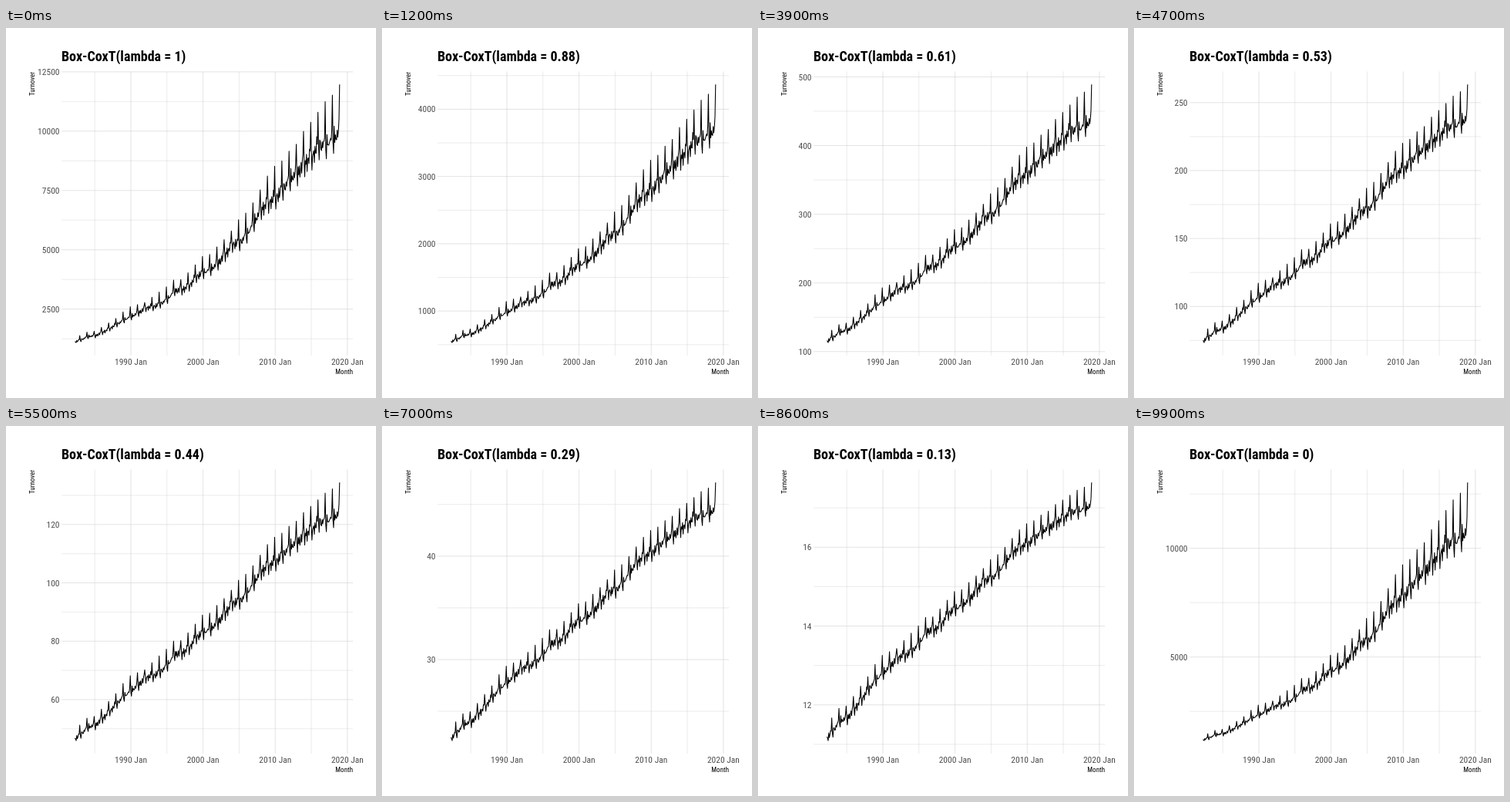
These frames come from a looping animation (480 px wide and 480 px high, 10000 ms). An HTML page with a canvas:

```html
<!DOCTYPE html>
<html lang="en">
<head>
<meta charset="utf-8">
<title>Box-Cox transformation</title>
<style>
html, body { margin: 0; width: 100%; height: 100%; overflow: hidden; background: #fff; }
canvas { display: block; width: 480px; height: 480px; }
</style>
</head>
<body>
<canvas id="stage"></canvas>
<script>
const canvas = document.getElementById('stage');
const ctx = canvas.getContext('2d');
const ratio = window.devicePixelRatio || 1;
canvas.width = canvas.height = 480 * ratio;

const FRAMES = 100, STEP = 100;
const LEFT = 72.2, RIGHT = 450, TOP = 56.4, BOTTOM = 424.9;
const FAMILY = '"Roboto Condensed", Roboto, sans-serif';

// Turnover in December, from 1982
const peaks = [
  1474, 1631, 1671, 1847, 2048, 2255, 2550, 2790, 2890, 2980, 3220, 3455, 3700,
  4010, 4030, 4340, 4700, 5090, 5180, 5530, 5860, 6265, 6780, 7090, 7560, 8156,
  8790, 9245, 9490, 9940, 10266, 10860, 11275, 11740, 12230, 12540, 13032
];
// Turnover in February, from 1982
const lows = [
  1090, 1200, 1340, 1370, 1515, 1680, 1865, 2050, 2190, 2345, 2560, 2600, 2722,
  2935, 3288, 3323, 3499, 3889, 4066, 4207, 4455, 4846, 5272, 5343, 5698, 6232,
  6783, 7068, 7264, 7674, 8103, 8335, 8763, 9070, 9545, 9588, 9840, 10150
];
// Log uplift over the February line, January to November
const season = [0.07, 0, 0.09, 0.065, 0.075, 0.035, 0.075, 0.07, 0.06, 0.095, 0.105];
// Log effect of an extra Sunday to Saturday
const weekday = [-0.012, -0.008, -0.006, -0.002, 0.009, 0.011, 0.008];

function tradingDays(year, month) {
  const days = new Date(Date.UTC(year, month + 1, 0)).getUTCDate();
  const first = new Date(Date.UTC(year, month, 1)).getUTCDay();
  let sum = 0;
  for (let d = 28; d < days; d++) sum += weekday[(first + d) % 7];
  return sum;
}

function turnover(year, month) {
  const y = year - 1982;
  if (month === 11) return peaks[y];
  if (month === 1) return lows[y];
  const a = Math.max(0, month < 1 ? y - 1 : y);
  const part = ((month + 11) % 12) / 12;
  const trend = Math.log(lows[a]) * (1 - part) + Math.log(lows[a + 1]) * part;
  return Math.exp(trend + season[month] + tradingDays(year, month));
}

const xOf = year => 162 + (year - 1990) * 9.364;
const series = [];
for (let n = 3; n < 37 * 12; n++) {
  const year = 1982 + Math.floor(n / 12), month = n % 12;
  series.push({ x: xOf(year + month / 12), value: turnover(year, month) });
}

const boxCox = (x, k) => k === 0 ? Math.log(x) : (Math.pow(x, k) - 1) / k;

// Extended Wilkinson axis breaks
function axisBreaks(lo, hi, m = 5) {
  const Q = [1, 5, 2, 2.5, 4, 3], range = hi - lo, eps = 1e-10;
  let best = -2, found = null;
  const total = (s, c, d) => 0.25 * s + 0.2 * c + 0.5 * d + 0.05;
  const spread = (a, b) => 1 - 0.5 * (a * a + b * b) / (0.01 * range * range);
  for (let j = 1; j < 50; j++) {
    for (let i = 0; i < Q.length; i++) {
      const q = Q[i], plain = 1 - i / (Q.length - 1) - j;
      if (total(plain + 1, 1, 1) < best) return found;
      for (let k = 2; k < 50; k++) {
        const dMax = k >= m ? 2 - (k - 1) / (m - 1) : 1;
        if (total(plain + 1, 1, dMax) < best) break;
        for (let z = Math.ceil(Math.log10(range / (k + 1) / j / q)); z < 12; z++) {
          const step = j * q * Math.pow(10, z), span = step * (k - 1);
          const half = Math.max(0, (span - range) / 2);
          if (total(plain + 1, spread(half, half), dMax) < best) break;
          const end = Math.ceil(lo / step) * j;
          for (let s = Math.floor(hi / step) * j - (k - 1) * j; s <= end; s++) {
            const min = s * step / j, max = min + span;
            const rest = ((min % step) + step) % step;
            const zero = (rest < eps || step - rest < eps) && min <= 0 && max >= 0;
            const r = (k - 1) / span;
            const want = (m - 1) / (Math.max(max, hi) - Math.min(min, lo));
            const score = total(plain + (zero ? 1 : 0), spread(hi - max, lo - min),
              2 - Math.max(r / want, want / r));
            if (score > best) {
              best = score;
              found = { min, step, count: k };
            }
          }
        }
      }
    }
  }
  return found;
}

function text(str, x, y, font, color, align) {
  ctx.font = font + ' ' + FAMILY;
  ctx.fillStyle = color;
  ctx.textAlign = align;
  ctx.fillText(str, x, y);
}

function line(x1, y1, x2, y2, width) {
  ctx.lineWidth = width;
  ctx.beginPath();
  ctx.moveTo(x1, y1);
  ctx.lineTo(x2, y2);
  ctx.stroke();
}

function decimals(values) {
  let n = 0;
  while (n < 4 && values.some(v => Math.abs(v - Number(v.toFixed(n))) > 1e-7)) n++;
  return n;
}

function draw(frame) {
  const shown = Math.round((1 - frame / (FRAMES - 1)) * 100);
  const lambda = shown === 0 ? 1 : (shown - 1) / 100;
  const values = series.map(p => boxCox(p.value, lambda));
  const low = Math.min(...values), high = Math.max(...values);
  const pad = (high - low) * 0.05, lo = low - pad, hi = high + pad;
  const yOf = v => BOTTOM - (v - lo) / (hi - lo) * (BOTTOM - TOP);
  const inside = v => v >= lo && v <= hi;

  ctx.setTransform(ratio, 0, 0, ratio, 0, 0);
  ctx.fillStyle = '#fff';
  ctx.fillRect(0, 0, 480, 480);

  const axis = axisBreaks(lo, hi);
  const major = [], minor = [];
  for (let i = -2; i <= axis.count + 1; i++) {
    const v = axis.min + i * axis.step;
    if (i >= 0 && i < axis.count && inside(v)) major.push(v);
    if (inside(v + axis.step / 2)) minor.push(v + axis.step / 2);
  }

  ctx.strokeStyle = '#ccc';
  minor.forEach(v => line(LEFT, yOf(v), RIGHT, yOf(v), 0.4));
  for (let year = 1985; year <= 2020; year += 5) {
    line(xOf(year), TOP, xOf(year), BOTTOM, year % 10 ? 0.4 : 0.55);
  }
  major.forEach(v => line(LEFT, yOf(v), RIGHT, yOf(v), 0.55));

  ctx.strokeStyle = '#000';
  ctx.lineWidth = 1.07;
  ctx.lineJoin = 'round';
  ctx.beginPath();
  series.forEach((p, i) => ctx.lineTo(p.x, yOf(values[i])));
  ctx.stroke();

  const places = decimals(major);
  const small = 'condensed 11.5px', tiny = 'condensed 9px';
  major.forEach(v => text(v.toFixed(places), 69.5, yOf(v) + 4.1, small, '#4d4d4d', 'right'));
  for (let year = 1990; year <= 2020; year += 10) {
    text(year + ' Jan', xOf(year), 437, small, '#4d4d4d', 'center');
  }
  text('Month', 450, 449, tiny, '#000', 'right');
  text('Box-CoxT(lambda = ' + shown / 100 + ')', 72, 43, 'bold condensed 18px', '#000', 'left');

  ctx.translate(36.5, 57);
  ctx.rotate(-Math.PI / 2);
  text('Turnover', 0, 0, tiny, '#000', 'right');
}

const start = performance.now();
let last = -1;
function tick() {
  const frame = Math.floor((performance.now() - start) / STEP) % FRAMES;
  if (frame !== last) draw(last = frame);
  requestAnimationFrame(tick);
}
tick();
</script>
</body>
</html>
```
